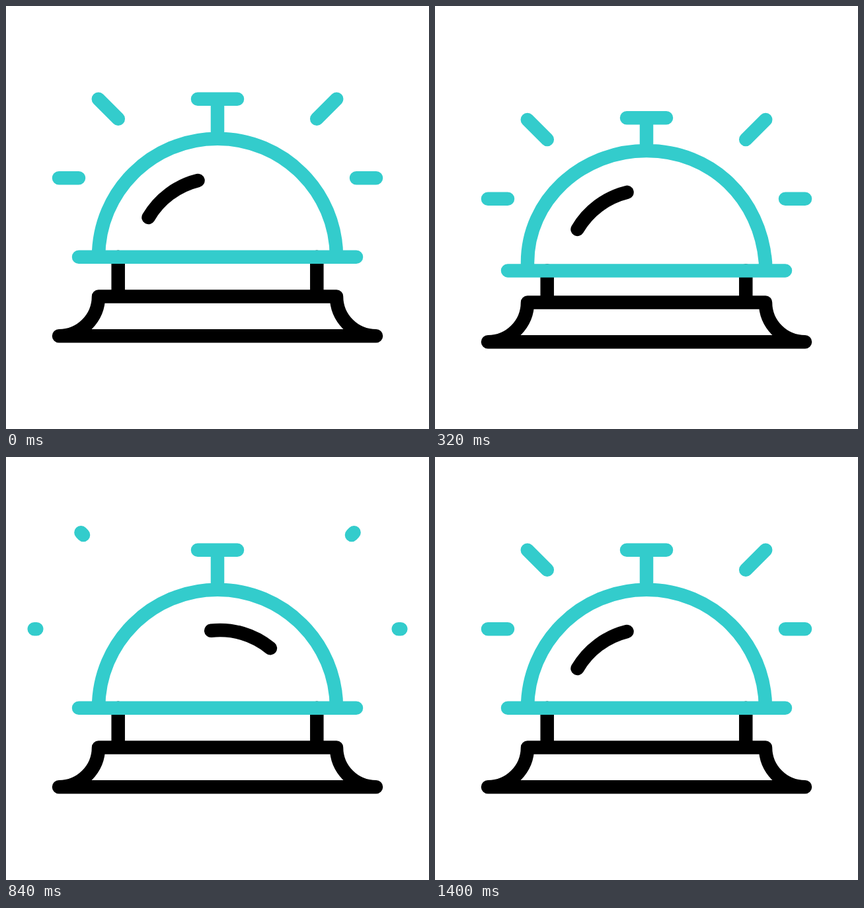
Write an HTML page that moves like this. It is 640 px wide and 640 px high and loops after 1480 ms.

```html
<!DOCTYPE html>
<html lang="en">
<head>
<meta charset="utf-8">
<title>Service bell</title>
<style>
  html, body { margin: 0; height: 100%; overflow: hidden; background: #fff; }
  svg { display: block; width: 100vw; height: 100vh; }
  path { fill: none; stroke: #000; stroke-width: 20.5; stroke-linecap: round; stroke-linejoin: round; }
  .teal { stroke: #3cc; }
</style>
</head>
<body>
<svg viewBox="0 0 640 640">
  <path id="base"/>
  <path id="shine" d="M215.5 320A120 120 0 0 1 290.5 264"/>
  <path id="bell" class="teal"/>
  <path id="rays" class="teal"/>
</svg>
<script>
const LOOP = 1480, STEP = 40;
const [base, shine, bell, rays] = ["base", "shine", "bell", "rays"].map(id => document.getElementById(id));

// Eased 0..1 progress between two times
function ramp(t, from, to) {
  const x = Math.min(1, Math.max(0, (t - from) / (to - from)));
  return x * x * (3 - 2 * x);
}

function basePath(press) {
  const top = 439.5 + 18.5 * press, bottom = top + 59.8, plate = 379.8 + 42 * press;
  return `M80 ${bottom}A60 60 0 0 0 140 ${top}H500A60 60 0 0 0 560 ${bottom}Z
    M169.7 ${plate}V${top}M470.3 ${plate}V${top}`;
}

function bellPath(press) {
  const plate = 379.8 + 42 * press, button = 140.8 + 58 * press;
  const top = 200.7 + 37.6 * press, foot = 379.8 + 17 * press;
  return `M110 ${plate}H530M290 ${button}H350M320 ${button}V${top}
    M140 ${plate}V${foot}C140 ${280.9 + 28 * press} 220.6 ${top} 320 ${top}
    C419.4 ${top} ${500 - 16 * press} ${280.9 + 23 * press} 500 ${foot}V${plate}`;
}

// A ray runs outward from (x, y) and is mirrored on the right side
function rayPair(x, y, dx, dy, shift, start, end) {
  const length = Math.hypot(dx, dy);
  const at = part => {
    const k = part + shift / length;
    return [x + dx * k, y + dy * k];
  };
  const [x1, y1] = at(start), [x2, y2] = at(end);
  return `M${x1} ${y1}L${x2} ${y2}M${640 - x1} ${y1}L${640 - x2} ${y2}`;
}

function raysPath(t, press) {
  const regrow = t > 1000;
  const start = regrow ? 0 : ramp(t, 605, 905);
  const end = regrow ? ramp(t, 1050, 1400) : 1;
  if (end <= start) return "";
  const shift = regrow ? 0 : 40 * ramp(t, 495, 905);
  const rebound = ramp(t, 207, 430) - ramp(t, 430, 560);
  const drop = 73.7 * press - 9.3 * rebound;
  return rayPair(110, 260.3 + drop, -30, 0, shift, start, end) +
    rayPair(169.8, 170.7 + drop, -30, -30, shift, start, end);
}

function draw(t) {
  const press = ramp(t, 40, 207) - ramp(t, 207, 430);
  const swing = 74 * (ramp(t, 432, 735) - ramp(t, 735, 1035));
  base.setAttribute("d", basePath(press));
  bell.setAttribute("d", bellPath(press));
  rays.setAttribute("d", raysPath(t, press));
  shine.setAttribute("transform", `translate(0 ${36.5 * press}) rotate(${swing} 320 386)`);
}

let origin;
function tick(now) {
  origin ??= now;
  draw(Math.floor((now - origin) % LOOP / STEP) * STEP);
  requestAnimationFrame(tick);
}
draw(0);
requestAnimationFrame(tick);
</script>
</body>
</html>
```
